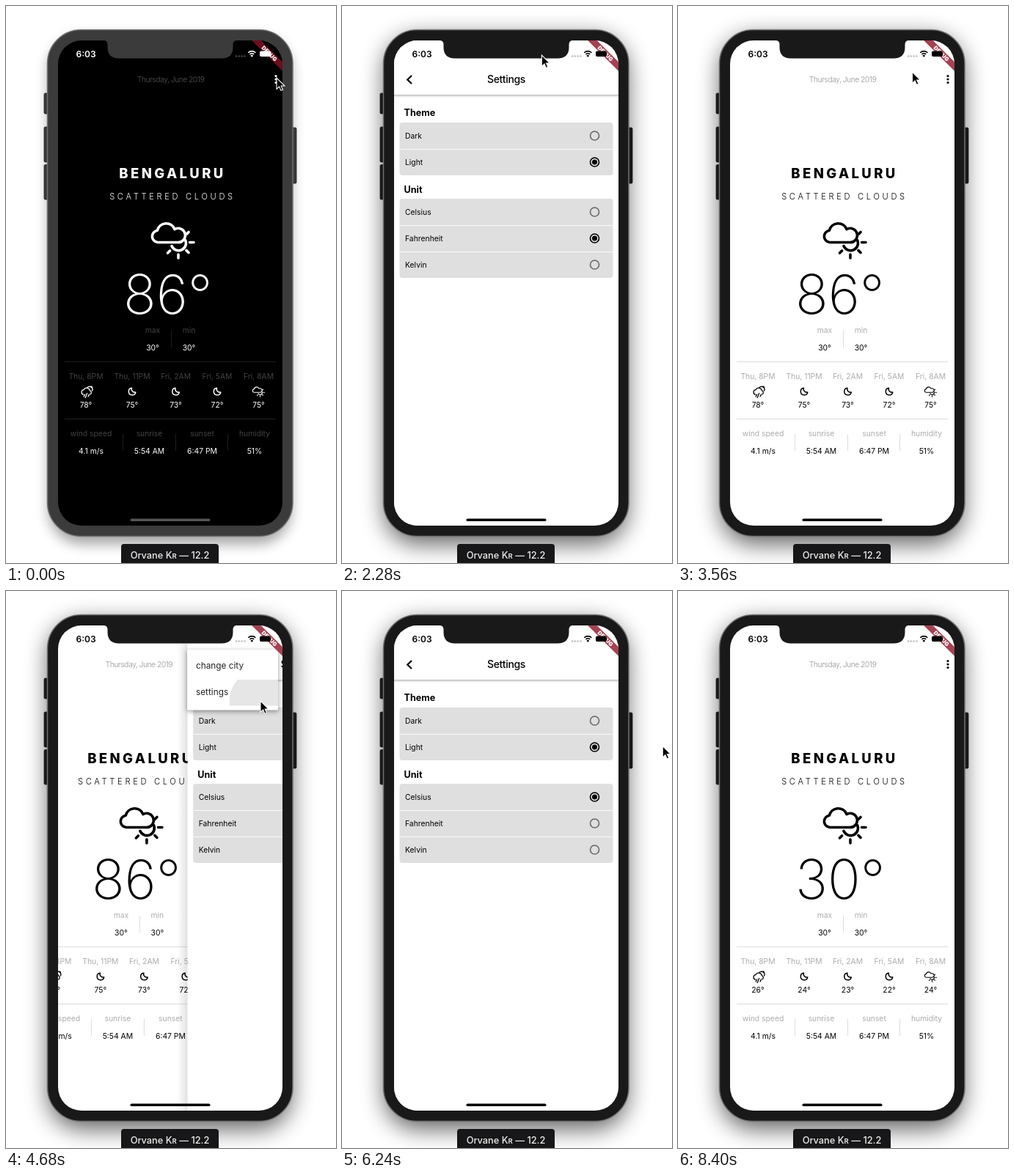
An HTML page for the animation above (8.68 s loop, 450 px wide and 760 px high).

```html
<!DOCTYPE html>
<html lang="en">
<head>
<meta charset="utf-8">
<title>Weather app</title>
<style>
  html, body { margin: 0; height: 100%; overflow: hidden; background: #fff; }
  svg { display: block; width: 450px; height: 760px; font: 400 10.35px Inter, sans-serif; }
  .bg { fill: var(--bg); }
  .fg { fill: var(--fg); }
  .muted { fill: var(--muted); }
  .card { fill: var(--card); }
  .line { stroke: var(--line); fill: none; }
  .gap { stroke: var(--gap); }
  .body { fill: var(--body); }
  .icon { fill: none; stroke: var(--fg); stroke-linecap: round; stroke-linejoin: round; }
  .mid { text-anchor: middle; }
  .head { font-size: 12.6px; font-weight: 700; }
  .shadow { fill: #000; }
</style>
</head>
<body>
<svg id="stage" viewBox="0 0 450 760"></svg>
<script>
const LOOP = 8680, WIDTH = 306;
const PUSHES = [955, 4635], POPS = [2850, 7210];
const MENUS = [[320, 955], [3820, 4635]], TAPS = [920, 4600];
const FOCUS = 320, LIGHT = 1560, CELSIUS = 5920, CURSOR_GONE = 8000;
const CURSOR = [ // time, x, y
  [0, 369, 98], [40, 369, 98], [160, 368, 99], [420, 368, 99], [720, 340, 151], [1290, 340, 151],
  [1500, 344, 211], [1790, 344, 211], [1960, 405, 262], [2060, 428, 190], [2170, 350, 80],
  [2280, 273, 67], [2480, 150, 84], [2650, 91, 100], [3130, 91, 100], [3560, 319, 90],
  [3720, 368, 99], [4080, 368, 99], [4420, 347, 150], [4900, 347, 150], [5440, 343, 347],
  [5520, 343, 347], [5760, 344, 282], [5960, 344, 282], [6240, 437, 212], [6350, 434, 130],
  [6480, 330, 66], [6760, 112, 98], [6820, 108, 99], [7040, 91, 100], [7500, 91, 100], [8000, 436, 34]
];
// Grey levels in the dark and the light theme
const GREYS = { bg: [0, 255], fg: [255, 0], muted: [66, 172], line: [30, 221],
                card: [26, 223], gap: [8, 250], off: [13, 104], bar: [85, 0], signal: [70, 190] };
const FAHRENHEIT = ['86', 78, 75, 73, 72, 75], METRIC = ['30', 26, 24, 23, 22, 24];

const clamp = v => Math.min(1, Math.max(0, v));
const mix = (a, b, p) => a + (b - a) * p;
const easeOut = v => 1 - (1 - clamp(v)) ** 3.3;
const grey = v => `rgb(${v},${v},${v})`;

const text = (x, y, str, cls = 'fg mid', extra = '') => `<text x="${x}" y="${y}" class="${cls}" ${extra}>${str}</text>`;
const rect = (x, y, w, h, cls, rx = 0, extra = '') =>
  `<rect x="${x}" y="${y}" width="${w}" height="${h}" rx="${rx}" class="${cls}" ${extra}/>`;
const path = (d, cls, extra = '') => `<path d="${d}" class="${cls}" ${extra}/>`;
const icon = (d, width, extra = '') => path(d, 'icon', `stroke-width="${width}" ${extra}`);

const CLOUD = 'M207 322.5a8.2 8.2 0 0 1-.6-16.3a12.4 12.4 0 0 1 23.6-1.6a9.6 9.6 0 1 1 4 17.9z';
const SUN = 'M244.6 319.5A10 10 0 0 1 226 327.5M250.5 322.5h5.5M246 311.5l3-3M246 333.5l3 3M235 339v5M223.5 334l-3 3';
const MOON = 'M-.6-4.7A4.8 4.8 0 1 0 4.8.9A4.4 4.4 0 0 1-.6-4.7z';
const RAIN = 'M-4.5 3.2a3.4 3.4 0 0 1 .3-6.6a4.6 4.6 0 0 1 8.6 1a3 3 0 0 1 .4 5.4M-2.5 3l-1.3 3M.6 1.5l-2.4 6M3.3 3l-1.3 3M1-6.5a4 4 0 0 1 6.5 4.5M4-7.6l3-.2l.8 3';

function home() {
  const smallIcon = (x, i) => i === 0 ? icon(RAIN, 1.3, `transform="translate(${x} 527)"`)
    : i === 4 ? icon(CLOUD + SUN, 4, `transform="translate(${x} 526.5) scale(.285) translate(-228 -320)"`)
    : icon(MOON, 1.5, `transform="translate(${x} 526)"`);
  const hours = ['Thu, 8PM', 'Thu, 11PM', 'Fri, 2AM', 'Fri, 5AM', 'Fri, 8AM'];
  const facts = [[116, 'wind speed', '4.1 m/s'], [195.5, 'sunrise', '5:54 AM'],
                 [267.5, 'sunset', '6:47 PM'], [339, 'humidity', '51%']];
  return rect(71, 47, WIDTH, 662, 'bg')
    + text(224.5, 104, 'Thursday, June 2019', 'muted mid', 'letter-spacing="-.55"')
    + [95.5, 100, 104.5].map(y => `<circle cx="368" cy="${y}" r="1.6" class="fg"/>`).join('')
    + text(227, 234.5, 'BENGALURU', 'fg mid', 'font-size="18.5" font-weight="800" letter-spacing="3.4"')
    + text(227, 264, 'SCATTERED CLOUDS', 'fg mid', 'font-size="11.1" font-weight="300" letter-spacing="3.7"')
    + icon(CLOUD + SUN, 3.6)
    + text(160, 419.5, '86°', 'fg', 'id="now" font-size="74" font-weight="250"')
    + text(200, 446, 'max', 'muted mid') + text(249.5, 446, 'min', 'muted mid')
    + text(200, 469.5, '30°') + text(249.5, 469.5, '30°')
    + path('M80 485.5H368M80 563.5H368M225.5 443V466M159.5 584V607M231.5 584V607M302.5 584V607', 'line')
    + hours.map((label, i) => {
        const x = [109, 172, 231.5, 288, 344.5][i];
        return text(x, 509, label, 'muted mid') + smallIcon(x + (i === 0 ? 1 : 0), i)
          + text(x, 547.8, '', 'fg mid temp');
      }).join('')
    + facts.map(([x, label, value]) => text(x, 587, label, 'muted mid') + text(x, 610.8, value)).join('');
}

const radio = (name, y) => `<circle id="${name}-ring" cx="344.5" cy="${y}" r="6" fill="none" stroke-width="1.6"/>
  <circle id="${name}-dot" cx="344.5" cy="${y}" class="fg"/>`;
const option = (name, y) => text(86, y + 3.8, name, 'fg') + radio(name, y);

function settings() {
  return rect(57, 47, 14, 662, '', 0, 'fill="url(#edge)"')
    + rect(71, 47, WIDTH, 662, 'bg')
    + [.24, .15, .08, .03].map((a, i) => rect(71, 121 + i, WIDTH, 1, 'shadow', 0, `opacity="${a}"`)).join('')
    + icon('M95 95L89.3 100.5L95 106', 2.3, 'style="stroke-linecap:butt;stroke-linejoin:miter"')
    + text(224, 105, 'Settings', 'fg mid', 'font-size="14" font-weight="500" letter-spacing="-.35"')
    + text(84.5, 150.3, 'Theme', 'fg head') + text(84.5, 254.5, 'Unit', 'fg head')
    + rect(78.5, 159, 291, 72, 'card', 4) + rect(78.5, 263, 291, 108, 'card', 4)
    + path('M79 195.5H369M79 299.5H369M79 335.5H369', 'gap')
    + option('Dark', 177) + option('Light', 213)
    + option('Celsius', 281) + option('Fahrenheit', 317) + option('Kelvin', 353);
}

function menu() {
  return `<g id="menu"><rect id="sheet" y="80" rx="1.5" fill="#fff" style="filter:drop-shadow(0 2px 3px rgba(0,0,0,.4))"/>
    <g clip-path="url(#sheetClip)">
      <g clip-path="url(#itemClip)"><circle id="ripple" fill="#e6e6e6"/></g>`
    + text(259, 106, 'change city', 'item', 'font-size="11.8" fill="#222"')
    + text(259, 141.5, 'settings', 'item', 'font-size="11.8" fill="#222"') + '</g></g>';
}

function statusBar() {
  return text(95.5, 69.5, '6:03', 'fg', 'font-size="12" font-weight="600"')
    + [314, 317.8, 321.6, 325.4].map(x => `<circle cx="${x}" cy="68.5" r="1.3" fill="var(--signal)"/>`).join('')
    + icon('M330.3 63.7a7 7 0 0 1 10 0M332.4 66a4 4 0 0 1 5.8 0', 1.6, 'style="stroke-linecap:butt"')
    + path('M335.3 69.8l-1.9-2a2.7 2.7 0 0 1 3.8 0z', 'fg')
    + rect(346, 61.5, 15, 7.5, 'fg', 2);
}

const stage = document.getElementById('stage');
stage.innerHTML = `<defs>
    <clipPath id="screen">${rect(71, 47, WIDTH, 662, '', 32)}</clipPath>
    <clipPath id="sheetClip"><rect id="sheetMask" y="80"/></clipPath>
    <clipPath id="itemClip">${rect(247, 121, 124, 35.5, '')}</clipPath>
    <linearGradient id="edge"><stop offset="0" stop-opacity="0"/><stop offset="1" stop-opacity=".12"/></linearGradient>
  </defs>`
  + rect(58, 42, 331, 692, 'shadow', 46, 'id="shadow"')
  + [[52, 119, 28], [52, 165, 48], [52, 216.5, 47.5], [389, 166, 76]].map(([x, y, h]) =>
      rect(x, y, 7, h, 'body', 1.5, 'stroke="#111" stroke-width=".7"')).join('')
  + rect(56.5, 32.5, 334.5, 691, 'body', 46, 'stroke="#707070" stroke-width="1.5"')
  + `<g clip-path="url(#screen)"><g id="home">${home()}</g><g id="settings">${settings()}</g>${menu()}`
  + path('M335.2 47H347.7L377 76.3V88.8z', '', 'id="ribbon"')
  + text(0, 2.7, 'DEBUG', 'mid', 'fill="#fff" font-size="7.5" font-weight="900" transform="translate(359.2 64.8) rotate(45)"')
  + statusBar()
  + rect(169.5, 699.5, 109, 3.6, '', 1.8, 'fill="var(--bar)"')
  + path('M133 46V47Q138.5 47 138.5 52.5V56Q138.5 71.5 154 71.5H294Q309.5 71.5 309.5 56V52.5Q309.5 47 315 47V46z', 'body')
  + '</g>'
  + rect(157, 734, 133, 30, '', 4, 'fill="#171719"')
  + text(223.5, 754, 'Orvane K<tspan font-size="9.5" font-weight="600">R</tspan> — 12.2', 'mid', 'fill="#ececec" font-size="12.8" font-weight="500"')
  + `<path id="cursor" d="M0 0V15.3L3.6 12L6 17.4L8.5 16.3L6.2 11H11z" fill="#000" stroke="#fff" stroke-width="1.1"/>`;

const el = id => document.getElementById(id);
const set = (id, attrs) => { for (const k in attrs) el(id).setAttribute(k, attrs[k]); };
const temps = [...document.querySelectorAll('.temp')], items = [...document.querySelectorAll('.item')];

// Smooth curve through the waypoints, at rest wherever the pointer pauses
function cursorAt(t) {
  const last = CURSOR.length - 1;
  let i = 0;
  while (i < last - 1 && CURSOR[i + 1][0] <= t) i++;
  const same = (a, b) => a[1] === b[1] && a[2] === b[2];
  const slope = (k, c) => {
    const before = CURSOR[k - 1], here = CURSOR[k], after = CURSOR[k + 1];
    if (!before || !after || same(before, here) || same(here, after)) return 0;
    return (after[c] - before[c]) / (after[0] - before[0]);
  };
  const [a, b] = [CURSOR[i], CURSOR[i + 1]], span = b[0] - a[0], s = clamp((t - a[0]) / span), r = 1 - s;
  return [1, 2].map(c => r * r * (1 + 2 * s) * a[c] + s * s * (3 - 2 * s) * b[c]
    + span * s * r * (r * slope(i, c) - s * slope(i + 1, c)));
}

function drawMenu(t) {
  let u = 0;
  for (const [open, close] of MENUS)
    if (t >= open && t < close + 300) u = Math.min(clamp((t - open) / 300), 1.5 * (1 - clamp((t - close) / 300)));
  const unit = 1 / 3.5, w = 124 * clamp(u / unit), h = 82.5 * clamp(u / (2 * unit));
  set('menu', { opacity: clamp(3 * u) });
  for (const id of ['sheet', 'sheetMask']) set(id, { x: 371 - w, width: w, height: h });
  items.forEach((item, i) => item.setAttribute('opacity', clamp((u - (i + 1) * unit) / (1.5 * unit))));
  const tap = TAPS.find(s => t >= s && t < s + 400);
  const [x, y] = cursorAt(t);
  set('ripple', { cx: x, cy: y, r: tap === undefined ? 0 : Math.min(130, (t - tap) * .525) });
}

function drawRadio(name, selected, theme) {
  const ring = mix(mix(...GREYS.off, theme), mix(...GREYS.fg, theme), selected);
  set(name + '-ring', { stroke: grey(ring) });
  set(name + '-dot', { r: 3.5 * selected });
}

function draw(t) {
  const theme = clamp((t - LIGHT) / 200), metric = clamp((t - CELSIUS) / 160), focused = t >= FOCUS;
  for (const name in GREYS) stage.style.setProperty('--' + name, grey(mix(...GREYS[name], theme)));
  stage.style.setProperty('--body', focused ? '#191919' : '#3b3b3b');
  el('shadow').style.cssText = focused ? 'filter:blur(16px);opacity:.62' : 'filter:blur(9px);opacity:.36';
  set('ribbon', { fill: `rgb(${mix(108, 164, theme)},${mix(14, 66, theme)},${mix(32, 82, theme)})` });

  let shown = 0;
  PUSHES.forEach((push, i) => shown += easeOut((t - push) / 300) - easeOut((t - POPS[i]) / 300));
  set('home', { transform: `translate(${-WIDTH * shown / 3} 0)` });
  set('settings', { transform: `translate(${WIDTH * (1 - shown)} 0)`, visibility: shown > .001 ? 'visible' : 'hidden' });

  const [now, ...hourly] = t < CELSIUS ? FAHRENHEIT : METRIC;
  el('now').textContent = now + '°';
  temps.forEach((node, i) => node.textContent = hourly[i] + '°');

  drawRadio('Dark', 1 - theme, theme);
  drawRadio('Light', theme, theme);
  drawRadio('Celsius', metric, theme);
  drawRadio('Fahrenheit', 1 - metric, theme);
  drawRadio('Kelvin', 0, theme);
  drawMenu(t);
  set('cursor', { transform: `translate(${cursorAt(t)})`, visibility: t < CURSOR_GONE ? 'visible' : 'hidden' });
}

const start = performance.now();
(function tick() {
  draw((performance.now() - start) % LOOP);
  requestAnimationFrame(tick);
})();
</script>
</body>
</html>
```
